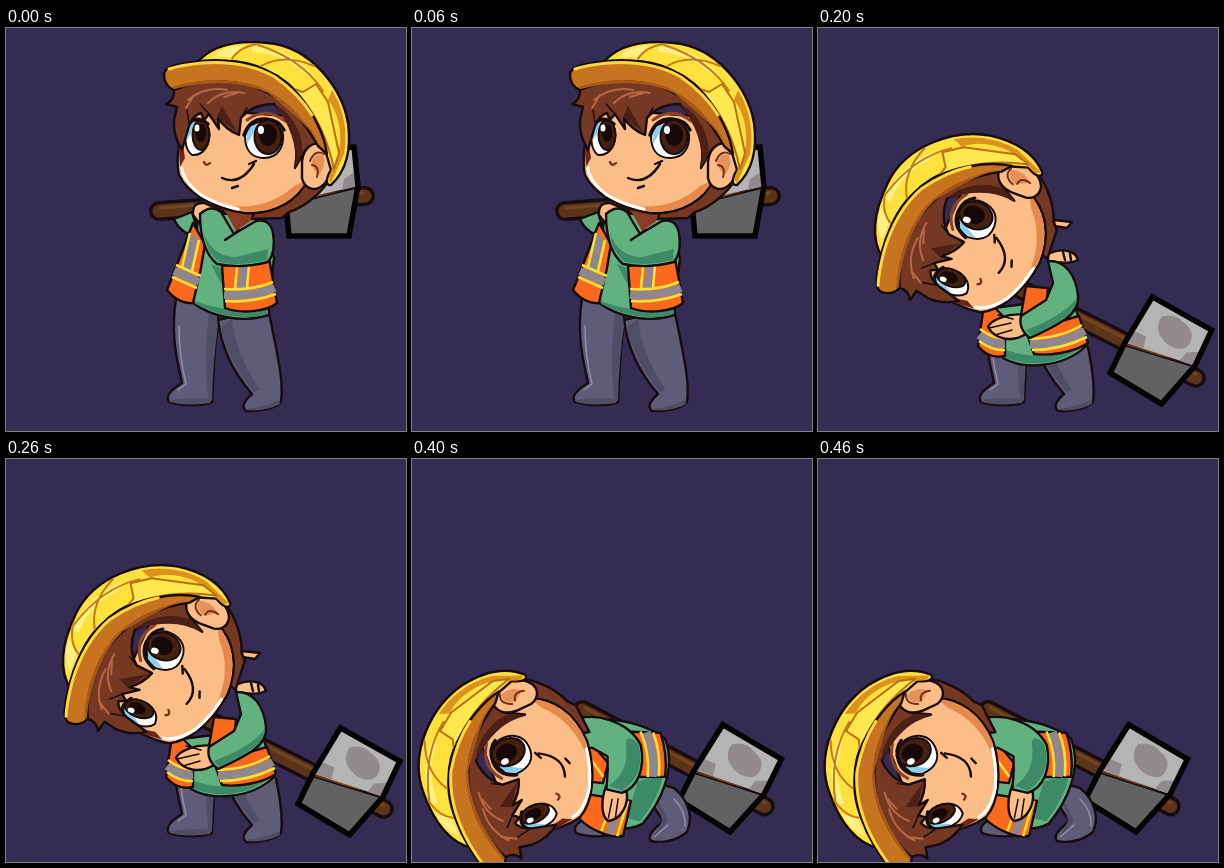
An HTML page that plays this animation: 400x403 px, repeating every 500 ms.

```html
<!DOCTYPE html>
<html lang="en">
<head>
<meta charset="utf-8">
<title>Builder bow</title>
<style>
html, body { margin: 0; width: 100%; height: 100%; overflow: hidden; background: #342c52; }
svg { display: block; width: 400px; height: 403px; stroke: #170c10; stroke-width: 2.4; stroke-linejoin: round; stroke-linecap: round; fill: none; }
.flat { stroke: none; }
.green { fill: #62b280; }
.shade { fill: #3c8a68; stroke: none; }
.vest { fill: #fb6a1c; }
.skin { fill: #fcbe86; }
.hair { fill: #753823; }
.grey { stroke: #8d8791; stroke-width: 8; stroke-linecap: butt; }
.lime { stroke: #f4e13c; stroke-width: 2.6; stroke-linecap: butt; }
.pants { fill: #5e5c77; }
.dark { fill: #504e67; stroke: none; }
.crease { stroke: #c47d16; stroke-width: 2; }
</style>
</head>
<body>
<svg viewBox="0 0 400 403">
  <clipPath id="legClip"><rect id="legRect" width="400" height="200"/></clipPath>

  <g id="hammer">
    <path d="M153 183L359 168" stroke-width="20"/>
    <path d="M153 183L359 168" stroke="#5b3419" stroke-width="13"/>
    <path d="M154 180L357 165" stroke="#75451f" stroke-width="3"/>
    <path class="flat" fill="#b5b4b5" d="M280 121L348 119L352 158L281 174Z"/>
    <path class="flat" fill="#918a8e" d="M298 133q10-10 22-6 16 2 16 15 0 11-17 12-22-3-21-21zM338 151l12-8 2 15-16 4zM281 160l14-2 4 12-18 3z"/>
    <path class="flat" fill="#626163" d="M283 177L351 160L343 208L283 208Z"/>
    <path stroke="#050405" stroke-width="5.5" stroke-linejoin="miter" d="M280 121L348 119L352 158L343 208L283 208L280 175Z"/>
    <path stroke-width="1.5" d="M282 177L350 160"/>
  </g>

  <g id="upright" class="variant" clip-path="url(#legClip)">
    <path class="pants" d="M212 292C216 325 232 350 246 366C238 373 235 379 240 383C255 384 270 380 275 374C278 352 271 325 262 280Z"/>
    <path class="dark" d="M215 300C220 326 236 350 248 364L254 362C239 340 228 315 226 290ZM240 381q18-2 33-9l1 4q-15 8-34 6z"/>
    <path class="pants" d="M170 270C164 310 172 335 176 355C165 362 159 368 163 374C175 379 200 378 206 374C208 345 207 325 212 298V275Z"/>
    <path class="dark" d="M203 285q-6 45-1 85l4 3q1-42 6-75l-2-15zM163 372q20-3 42-1l-1 4q-25 3-40-1z"/>
    <path stroke="#9290a9" stroke-width="1.5" d="M173 298q0 30 7 58l-8 6"/>
  </g>

  <g id="crouched" class="variant">
    <path class="pants" d="M238 322L262 329C278 342 281 360 275 373C263 383 248 384 239 382C234 376 243 370 251 362L240 345Z"/>
    <path class="dark" d="M243 335L256 361L245 376L240 380L250 362Z"/>
    <path stroke="#9290a9" stroke-width="1.5" d="M242 378l14-12M262 340q12 12 11 27"/>
    <path class="pants" d="M174 346C184 338 197 342 206 352L208 374C196 379 174 378 164 374C160 367 168 362 176 359Z"/>
    <path d="M176 359L191 375M185 347Q193 360 206 366"/>
  </g>

  <g id="standing" class="variant">
    <path class="green" d="M168 191L186 184L192 205L180 205Q171 199 168 191Z"/>
    <path class="green" d="M192 184L255 188L268 230L262 287C235 296 205 288 187 275Z"/>
    <path class="shade" d="M205 236L217 241L219 262L212 250ZM189 273Q222 286 262 282L262 286Q230 296 189 276Z"/>
    <path class="vest" d="M187 195C178 218 170 240 161 262C168 271 178 276 187 275L195 240L199 216Z"/>
    <path class="grey" d="M168 243L193 254M188 208L181 244"/>
    <path class="lime" d="M170 237L195 248M166 249L191 260M184 205L176 239M193 212L186 243"/>
    <path class="vest" d="M216 238L263 230L271 275C260 284 235 286 219 280Z"/>
    <path class="grey" d="M218 267Q245 269 269 260M238 238L235 262"/>
    <path class="lime" d="M218 261Q245 263 267 254M219 273Q245 275 270 266M231 239L229 260M243 237L241 260"/>
    <path class="skin" d="M187 187Q186 174 198 175L217 183L211 190L194 196Z"/>
    <path class="green" d="M194 186Q205 176 215 184L228 206L250 193Q264 190 267 205Q270 224 262 234Q236 241 211 236Q194 222 194 186Z"/>
    <path class="shade" d="M198 206Q207 229 230 229L262 221L261 232Q233 239 213 234Q200 224 198 206Z"/>
    <path d="M228 206L219 212M228 206L233 202"/>
    <path class="flat" fill="#8c3b22" d="M219 183L248 184L246 192L230 203Z"/>
  </g>

  <g id="leaning" class="variant">
    <path class="skin" d="M236 192L254 194L249 200L236 198ZM230 226C245 219 258 223 260 232C250 237 240 234 230 233Z"/>
    <path d="M245 224l2 8M252 226l1 6"/>
    <path class="green" d="M175 280L255 270L268 318C245 340 205 342 185 330Z"/>
    <path class="shade" d="M188 322Q230 336 266 317Q232 345 187 330Z"/>
    <path class="vest" d="M167 270L160 318C168 328 178 330 187 328V290Z"/>
    <path class="grey" d="M161 307Q174 317 187 316"/>
    <path class="lime" d="M162 301Q175 311 187 310M161 313Q174 323 187 322"/>
    <path class="vest" d="M208 303L261 288L270 315C255 325 230 328 216 326Z"/>
    <path class="grey" d="M212 317Q243 316 267 303"/>
    <path class="lime" d="M211 311Q243 310 264 297M214 322Q243 322 269 309"/>
    <path class="vest" d="M203 287L208 258L230 260L228 282Z"/>
    <path class="skin" d="M207 287C190 284 172 293 170 299C178 313 195 314 208 306Z"/>
    <path stroke-width="1.5" d="M171 300l22-5M177 307l17-5M180 287l15 4"/>
    <path class="green" d="M230 233C248 232 258 248 260 268C262 287 240 297 212 310Q200 301 203 288L228 272L235 255Z"/>
    <path class="shade" d="M208 302Q245 288 258 271Q258 289 213 308Z"/>
  </g>

  <g id="lying" class="variant">
    <path class="green" d="M180 255C215 245 260 268 277 290C281 322 258 350 235 367C215 372 190 360 182 340Z"/>
    <path class="shade" d="M240 325L267 324Q256 347 233 364L221 358Z"/>
    <path class="vest" d="M246 275L274 283Q276 305 268 327L243 321Z"/>
    <path class="grey" d="M261 279Q264 302 256 324"/>
    <path class="lime" d="M255 277Q259 300 251 323M267 281Q270 302 262 325"/>
    <path class="vest" d="M188 325L229 342L213 374C203 375 183 362 174 346Z"/>
    <path class="grey" d="M220 338L200 369"/>
    <path class="lime" d="M214 334L193 364M226 341L207 373"/>
    <path class="vest" d="M182 275L205 277L216 300L206 318L184 310Z"/>
    <path class="lime" d="M194 277L208 312"/>
    <path class="skin" d="M209 321C200 333 196 350 202 356C215 358 226 345 227 332Z"/>
    <path stroke-width="1.5" d="M203 353l8-17M210 354l7-17"/>
    <path class="green" d="M188 251C215 244 246 265 252 290C251 315 238 331 222 332L208 325L214 306L217 293L204 281L190 281Z"/>
    <path class="shade" d="M211 322Q235 314 238 285Q241 275 250 289Q250 320 223 330Z"/>
  </g>

  <g id="head">
    <path class="hair" d="M300 110L326 148C314 168 296 180 283 184L276 190L246 191L252 170Z"/>
    <path class="skin" d="M180 80C172 110 170 135 173 147C181 164 205 180 238 185C270 187 294 171 302 150L306 90Z"/>
    <path class="flat" fill="#e58a4c" d="M222 178Q262 182 288 158L301 152Q282 184 240 184Z"/>
    <path stroke="#fff" stroke-width="3" d="M176 140Q177 153 195 167Q212 177 232 181"/>
    <path class="flat" fill="#6c2518" d="M172 108L181 94L177 118L179 130L174 139Z"/>

    <g stroke-width="2">
      <path fill="#fff" d="M184 94C177 104 178 121 186 127C198 128 205 116 203 102C199 90 190 88 184 94Z"/>
      <path class="flat" fill="#89cfee" d="M185 93Q179 102 181 112L186 104L192 93Z"/>
      <ellipse cx="195" cy="107" rx="8.500" ry="15" fill="#45200f"/>
      <path fill="#fff" d="M239 108C239 120 244 130 258 130C272 130 278 119 277 106C271 90 245 88 239 108Z"/>
      <path class="flat" fill="#89cfee" d="M245 98Q239 106 241 116L247 106L256 95Z"/>
      <ellipse cx="262" cy="109" rx="13.500" ry="17" fill="#45200f"/>
    </g>
    <g class="flat">
      <ellipse cx="195" cy="105" rx="5.500" ry="9" fill="#150807"/>
      <ellipse cx="262" cy="107" rx="9" ry="11" fill="#150807"/>
      <ellipse cx="191" cy="100" rx="2.500" ry="3.500" fill="#fff"/>
      <ellipse cx="255" cy="102" rx="3" ry="4" fill="#fff"/>
    </g>
    <path stroke="#8b4325" stroke-width="3" d="M241 92Q260 78 279 93"/>
    <path stroke-width="3.500" d="M182 97Q190 86 202 96M238 107Q244 90 260 91Q273 92 278 102"/>
    <path d="M198 134Q200 139 204 135" stroke="#7d321b"/>
    <path d="M216 150Q234 158 248 136M243 136L250 133M226 160L232 158"/>

    <path class="hair" d="M168 61C195 47 250 47 285 72C302 90 314 108 319 122Q305 114 299 123L289 140C293 119 288 96 268 76Q247 76 235 90L233 107Q220 102 212 90L213 101L203 86L198 92L195 85Q187 87 183 98L176 122Q167 108 168 92L171 79L160 76Q169 72 168 61Z"/>
    <path class="flat" fill="#4c2017" d="M268 76Q286 84 295 110L297 125L289 140Q293 108 268 76ZM211 89L216 78L231 104Z"/>
    <path stroke="#b76742" stroke-width="2" d="M182 72Q199 58 221 62M202 75Q216 61 238 65M188 67L180 80M218 69L231 65"/>
    <path stroke-width="1.500" d="M203 86L194 76M235 90L241 80M183 95L181 82"/>

    <path class="skin" d="M296 139C295 122 305 113 317 116C330 120 329 143 319 155C309 166 298 160 296 150Z"/>
    <path class="flat" fill="#e3935a" d="M305 136Q308 124 317 127Q321 136 313 147Q309 145 305 136Z"/>
    <path stroke="#763019" stroke-width="2" d="M304 133Q309 121 318 126M306 137Q314 138 311 149"/>

    <path fill="#ffe13e" d="M190 36C205 17 232 12 262 15C305 19 336 60 342 95C346 125 338 145 325 157C319 158 320 150 325 142L318 118C312 85 290 55 260 42C240 32 215 31 190 36Z"/>
    <path class="flat" fill="#dd921d" d="M326 62Q344 92 338 126L325 155L322 151L327 138L334 118Q336 90 322 72Z"/>
    <path class="flat" fill="#fff086" d="M207 29Q217 18 237 17L226 29ZM246 18Q289 20 310 52L296 44Q276 25 246 24Z"/>
    <path class="crease" d="M226 31Q233 19 252 16M255 38Q278 25 308 38M252 17Q296 31 317 63"/>
    <path fill="#ffe84f" stroke="#b96f16" stroke-width="2" d="M285 60L297 64L310 56L322 74L333 125L328 141Q319 99 297 72Z"/>
    <path fill="#c77420" d="M158 47C158 39 168 36 195 33C235 29 270 42 292 66C308 86 318 105 321 126L312 118C300 96 285 77 262 65C235 50 195 50 168 62C162 60 158 54 158 47Z"/>
    <path class="flat" fill="#a9581a" d="M166 59Q211 45 255 59Q291 78 314 115Q300 95 262 65Q223 47 168 61Z"/>
    <path stroke="#fbd93c" stroke-width="3" d="M163 41Q175 37 196 35Q239 32 269 49Q293 66 306 87"/>
  </g>
</svg>
<script>
const STEP = 100;
const find = id => document.getElementById(id);
const pivots = { head: [192, 108], hammer: [280, 211], body: [212, 340] };
// Each placement is [x, y, degrees] of the part's pivot.
const poses = [
  { head: [192, 108, 0],    hammer: [280, 211, 0],  torso: "standing", body: [212, 340, 0],   legs: "upright", legTop: 265 },
  { head: [192, 148, 1],    hammer: [280, 251, 0],  torso: "standing", body: [212, 380, 0],   legs: "upright", legTop: 308 },
  { head: [133, 253, -70],  hammer: [288, 346, 31], torso: "leaning",  body: [212, 340, 0],   legs: "upright", legTop: 318 },
  { head: [122, 338, -100], hammer: [281, 334, 31], torso: "lying",    body: [212, 340, 0],   legs: "crouched" },
  { head: [125, 357, -115], hammer: [263, 342, 32], torso: "lying",    body: [202, 344, -14], legs: "crouched" }
];

function place(id, [x, y, angle], [pivotX, pivotY]) {
  find(id).setAttribute("transform", `translate(${x} ${y}) rotate(${angle}) translate(${-pivotX} ${-pivotY})`);
}

function draw(time) {
  const pose = poses[Math.floor(time / STEP) % poses.length];
  place("head", pose.head, pivots.head);
  place("hammer", pose.hammer, pivots.hammer);
  place(pose.torso, pose.body, pivots.body);
  for (const part of document.querySelectorAll(".variant"))
    part.style.display = [pose.torso, pose.legs].includes(part.id) ? "" : "none";
  find("legRect").setAttribute("y", pose.legTop ?? 0);
}

const start = performance.now();
function tick() {
  draw(performance.now() - start);
  requestAnimationFrame(tick);
}
tick();
</script>
</body>
</html>
```
